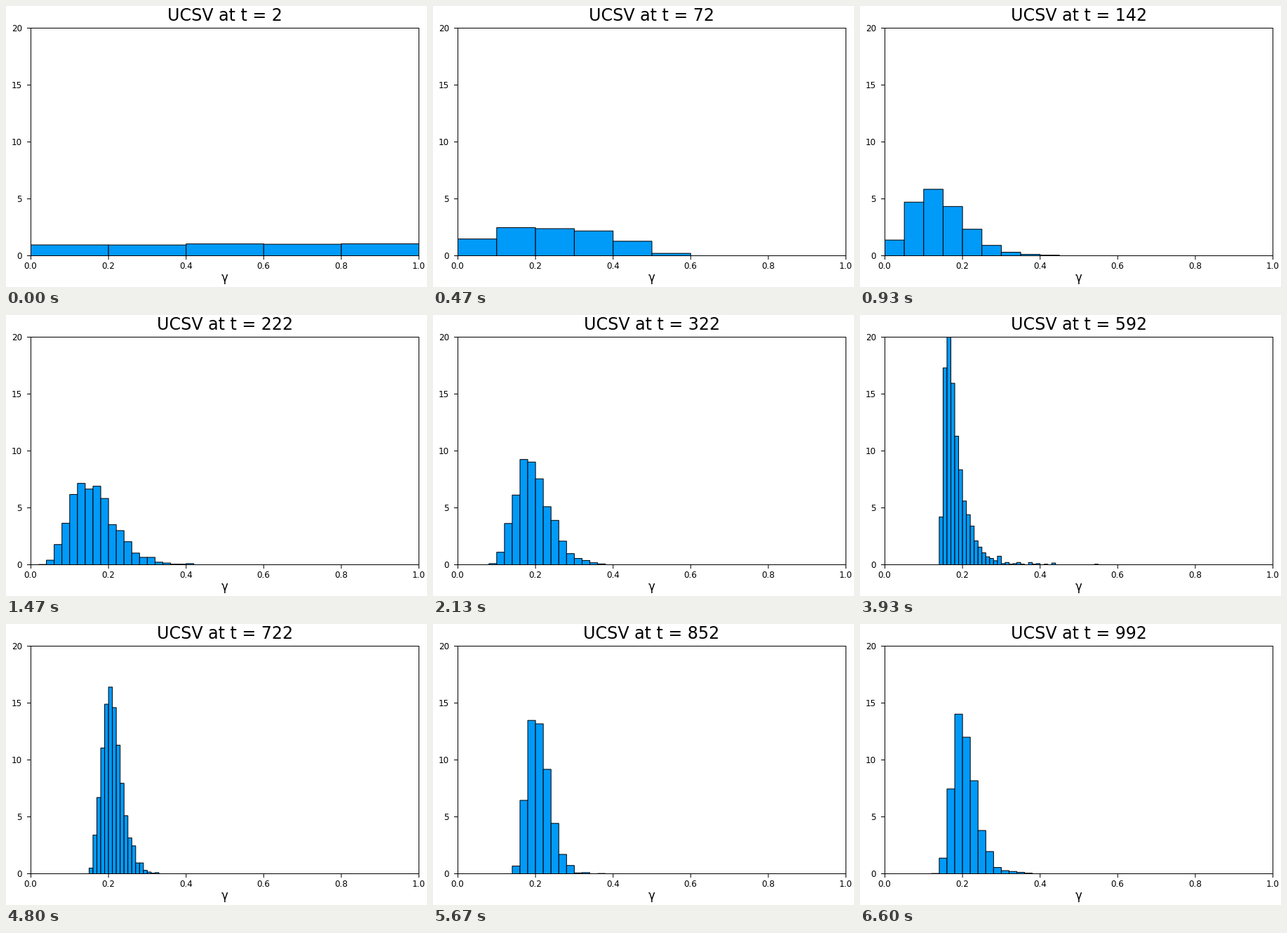
A matplotlib script that plays this animation: 600 by 400 pixels, repeating every 6.67 s.

```python
from math import erf, sqrt

import numpy as np
import matplotlib.pyplot as plt
from matplotlib.animation import FuncAnimation
from matplotlib.collections import LineCollection, PolyCollection

W, H = 600, 400
LEFT, RIGHT, TOP, BOTTOM = 35.5, 588.5, 31.5, 355.5
PX = 0.72  # points per pixel at 100 dpi
TICK = 5
FRAMES, INTERVAL = 290, 23
STEPS, STEP_MS = 100, 200 / 3
N = 2000  # particles

plt.rcParams["font.family"] = "DejaVu Sans"

# Shifted lognormal at key steps: (step, origin, median, sigma)
KEYS = [
    (14, -0.1, 0.132, 0.285),
    (32, 0.0, 0.19, 0.225),
    (47, 0.0, 0.1735, 0.185),
    (59, 0.14, 0.175, 0.7),
    (72, 0.1, 0.208, 0.235),
    (99, 0.1, 0.202, 0.29),
]
WIDTHS = (0.2, 0.1, 0.05, 0.02, 0.01)

# Evenly ranked particles and their standard normal scores
RANK = (np.arange(N) + 0.5) / N
GRID = np.linspace(-4, 4, 801)
SCORE = np.interp(RANK, [(1 + erf(z / sqrt(2))) / 2 for z in GRID], GRID)

# The cloud starts uniform, then takes each key shape in turn
TIMES = [0] + [key[0] for key in KEYS]
CLOUDS = [RANK] + [o + (m - o) * np.exp(s * SCORE) for _, o, m, s in KEYS]


def cloud_at(k):
    i = min(np.searchsorted(TIMES, k, side="right"), len(TIMES) - 1) - 1
    u = (k - TIMES[i]) / (TIMES[i + 1] - TIMES[i])
    if i == 0:
        u = sqrt(u)  # the flat start collapses quickly
    return (1 - u) * CLOUDS[i] + u * CLOUDS[i + 1]


def histogram(k):
    """Left edges, bin width and densities of the resampled cloud."""
    cloud = cloud_at(k)
    spread = cloud[3 * N // 4] - cloud[N // 4]
    width = next((w for w in WIDTHS if w <= 0.57 * spread), WIDTHS[-1])
    edges = width * np.arange(round(1 / width) + 1)
    sample = np.random.default_rng(k).choice(cloud, N)
    count, _ = np.histogram(np.clip(sample, 0, 0.9999), edges)
    return edges[:-1], width, count / (N * width)


def px(g):
    return LEFT + (RIGHT - LEFT) * g


def py(d):
    return BOTTOM - (BOTTOM - TOP) * np.minimum(d, 20) / 20


def label(x, y, text, size, ha="center"):
    return ax.text(x, y, text, fontsize=size * PX, ha=ha, va="baseline")


fig = plt.figure(figsize=(W / 100, H / 100), dpi=100, facecolor="white")
ax = fig.add_axes([0, 0, 1, 1])
ax.set(xlim=(0, W), ylim=(H, 0))
ax.axis("off")

bars = PolyCollection([], facecolor="#009AF9", edgecolor="black", linewidth=PX,
                      joinstyle="miter", snap=False, zorder=1)
ax.add_collection(bars, autolim=False)

lines = [[(LEFT, y), (RIGHT, y)] for y in (TOP, BOTTOM)]
lines += [[(x, TOP), (x, BOTTOM)] for x in (LEFT, RIGHT)]
for n in range(6):
    x = px(n / 5)
    lines.append([(x, BOTTOM), (x, BOTTOM + TICK)])
    label(x - 0.4, 374.3, f"{n / 5:.1f}", 12)
for n in range(0, 21, 5):
    y = py(n)
    lines.append([(LEFT - TICK, y), (LEFT, y)])
    label(22.8, y + 4.5, str(n), 12, "right")
ax.add_collection(LineCollection(lines, color="black", linewidth=PX, snap=False,
                                 capstyle="projecting", zorder=2), autolim=False)

mid = px(0.5) - 0.4
label(mid, 391.8, "γ", 16.5)
title = label(mid, 21, "", 23.8)


def draw(frame):
    # each tick shows the step that begins within it
    now = (frame + 1) * INTERVAL + 2.4
    k = min(int(now / STEP_MS), STEPS - 1)
    x, w, d = histogram(k)
    bars.set_verts([[(px(a), BOTTOM), (px(a), py(h)), (px(a + w), py(h)), (px(a + w), BOTTOM)]
                    for a, h in zip(x, d) if h > 0.02])
    title.set_text(f"UCSV at t = {2 + 10 * k}")
    return bars, title


anim = FuncAnimation(fig, draw, frames=FRAMES, interval=INTERVAL,
                     repeat=True, repeat_delay=0)
plt.show()
```
